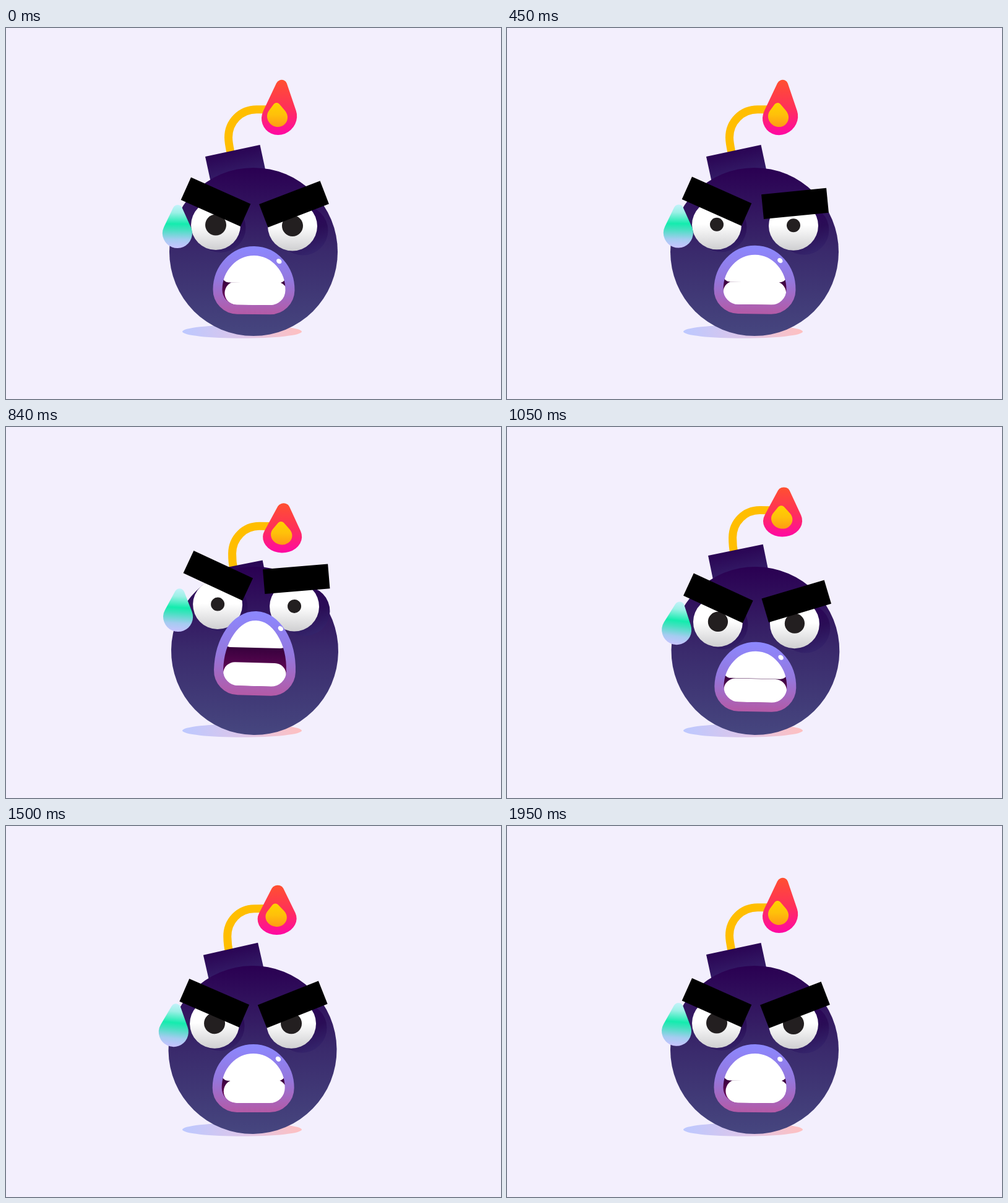
An HTML page with a canvas that plays this animation: 800x600 px, repeating every 1980 ms.

```html
<!DOCTYPE html>
<html lang="en">
<head>
<meta charset="utf-8">
<title>Angry bomb</title>
<style>
html, body { margin: 0; width: 100%; height: 100%; overflow: hidden; background: #f3effd; }
canvas { display: block; width: 800px; height: 600px; }
</style>
</head>
<body>
<canvas id="stage" width="800" height="600"></canvas>
<script>
const ctx = document.getElementById('stage').getContext('2d');
const LOOP = 1980, TAU = Math.PI * 2, RAD = Math.PI / 180;

// Five poses per 180 ms, the first one held twice as long.
function beatAt(ms) {
  const slot = Math.floor((ms % LOOP) / 30);
  return 5 * Math.floor(slot / 6) + Math.max(0, slot % 6 - 1);
}

// Eased interpolation through [beat, value] pairs.
function key(b, ...pts) {
  if (b <= pts[0][0]) return pts[0][1];
  for (let i = 1; i < pts.length; i++) {
    const [t0, v0] = pts[i - 1], [t1, v1] = pts[i];
    if (b <= t1) return v0 + (v1 - v0) * (1 - Math.cos(Math.PI * (b - t0) / (t1 - t0))) / 2;
  }
  return pts[pts.length - 1][1];
}

// Flicker with a period of six beats.
function flick(b, mid, c, s) {
  const a = b * TAU / 6;
  return mid + c * Math.cos(a) + s * Math.sin(a);
}

function grad(x0, y0, x1, y1, ...stops) {
  const g = ctx.createLinearGradient(x0, y0, x1, y1);
  stops.forEach((s, i) => Array.isArray(s) ? g.addColorStop(s[0], s[1])
    : g.addColorStop(i / (stops.length - 1), s));
  return g;
}

function oval(x, y, rx, ry, fill, turn = 0) {
  ctx.beginPath();
  ctx.ellipse(x, y, rx, ry, turn, 0, TAU);
  ctx.fillStyle = fill;
  ctx.fill();
}

function at(x, y, turn, draw) {
  ctx.save();
  ctx.translate(x, y);
  ctx.rotate(turn);
  draw();
  ctx.restore();
}

// Rounded teardrop standing on `bottom`; tall and tip are relative to the base radius.
function tear(cx, bottom, w, h, lean, tall, tip, ...stops) {
  const d = tall - 1 - tip, a = Math.asin((1 - tip) / d), sy = h / tall;
  ctx.save();
  ctx.transform(w / 2, 0, -lean / d, sy, cx, bottom - sy);
  ctx.beginPath();
  ctx.arc(0, 0, 1, -a, Math.PI + a);
  ctx.arc(0, -d, tip, Math.PI + a, TAU - a);
  ctx.closePath();
  ctx.fillStyle = grad(0, 1 - tall, 0, 1, ...stops);
  ctx.fill();
  ctx.restore();
}

function fuse(b) {
  const glow = Math.cos((b - 1) * TAU / 6), k = (0.5 - glow) / 1.5;
  const x = 359.5 + 2.6 * k, y = 131.7 + 3 * k;
  ctx.beginPath();
  ctx.moveTo(364 + 0.6 * k, 206);
  ctx.bezierCurveTo(361.5, 194, x, 186, x, 177 + 2 * k);
  ctx.bezierCurveTo(x, 152 + 2 * k, 379 + 2 * k, y, 405, y);
  ctx.lineTo(424, y);
  ctx.lineWidth = 13;
  ctx.strokeStyle = '#ffbe00';
  ctx.stroke();

  const top = 90 - 12.4 * glow, base = 174.7 - 3.3 * glow;
  tear(441.8 - 0.3 * glow, base, 60 - 6 * glow, base - top, 2.3 + 2.3 * glow,
    3.12, 0.32, '#ff5030', '#ff3158', '#ff08a4');
  tear(flick(b, 441, -2.5, -0.87), flick(b, 161.7, -1.7, -2.9),
    flick(b, 30.7, 2.3, -2.9), flick(b, 41.7, -2.7, 3.4), flick(b, 0, -1, 0.5),
    2.4, 0.36, '#ffd200', '#ffc00a', '#ff9a14');
}

function cap() {
  at(322, 208, -12.2 * RAD, () => {
    ctx.fillStyle = grad(0, 0, 0, 46, '#2a0454', '#35206a');
    ctx.fillRect(0, 0, 90.5, 70);
  });
}

function eye(x, y, r, shX, shY) {
  oval(x + shX, y + shY, 40.5, 40, grad(x, y - 20, x + 22, y + 45, '#2c0458', '#2a0d56', '#34236a'));
  oval(x, y, 40, 40, grad(0, y - 40, 0, y + 40, [0, '#fff'], [0.48, '#fff'], [1, '#cfcfd1']));
  oval(x, y - 0.5, r, r, '#231f20');
}

function brow(x, y, deg, w) {
  at(x, y, deg * RAD, () => {
    ctx.fillStyle = '#000';
    ctx.fillRect(-w / 2, -20, w, 40);
  });
}

function mouthPath(top, bottom, l, r) {
  const mid = (l + r) / 2, rx = mid - l, c = 0.552;
  const side = bottom - 32, ry = side - top;
  ctx.beginPath();
  ctx.moveTo(l, side);
  ctx.bezierCurveTo(l, side - ry * c, mid - rx * c, top, mid, top);
  ctx.bezierCurveTo(mid + rx * c, top, r, side - ry * c, r, side);
  ctx.arcTo(r, bottom, mid, bottom, 32);
  ctx.arcTo(l, bottom, l, side, 32);
  ctx.closePath();
}

function mouth(s, jaw) {
  const top = 353 - 55 * s, bottom = 463 - 29 * s;
  at(400, bottom, 0.7 * RAD, () => {
    ctx.translate(-400, -bottom);
    mouthPath(top + 7.5, bottom - 7.5, 341.5, 458.5);
    ctx.save();
    ctx.clip();
    ctx.fillStyle = grad(0, top + 50, 0, bottom - 15, '#2e0038', '#7a0a62');
    ctx.fillRect(330, top, 140, bottom - top);
    ctx.fillStyle = '#fff';
    ctx.beginPath();
    ctx.roundRect(348, top - 10, 104, 69, 12);
    ctx.roundRect(349 + jaw, bottom - 53, 102, 38, 19);
    ctx.fill();
    ctx.restore();
    mouthPath(top + 7.5, bottom - 7.5, 341.5, 458.5);
    ctx.lineWidth = 15;
    ctx.strokeStyle = grad(0, top, 0, bottom, '#8c88ff', '#9478de', '#b45aa6');
    ctx.stroke();
  });
  oval(441.3, 377.3 - 52 * s, 4.6, 3.6, '#fff', 0.7);
}

function render(b) {
  const scream = key(b, [11, 0], [16, 0.24], [21, 1], [25, 1], [30, 0]);
  const sink = 26.5 * Math.pow(scream, 1.5);
  const shake = key(b, [16, 0], [23, 0.94], [28, 2.1], [36, 1.55], [45, 0]);
  const tilt = shake * Math.sin((b - 16) * TAU / 5.3);
  const pupil = key(b, [0, 17], [8, 13], [16, 9], [23, 11], [31, 17]);
  const rightBrow = key(b, [0, -21], [6, -5.6], [25, -5.6], [31, -21]);
  const dip = key(b, [36, 0], [41, 4.5]);
  const jaw = key(b, [1, 4], [5, -2], [9, -2], [13, 0], [29, 0], [33, -2], [38, -2], [42, 4]);
  const swing = -2 + 3.5 * Math.cos((b - 9.8) * TAU / 12) - 3 * scream;

  ctx.fillStyle = '#f3effd';
  ctx.fillRect(0, 0, 800, 600);
  oval(381.5, 491, 96.5, 10.8, grad(285, 0, 478, 0, '#bcc8ff', '#dcc6ea', '#ffc0c0'));

  at(400, 497, tilt * RAD, () => {
    ctx.translate(-400, -497);
    ctx.save();
    ctx.translate(0, sink);
    fuse(b);
    cap();
    ctx.restore();

    oval(400, 362, 136 - scream, 136, grad(0, 226, 0, 498, '#2a0052', '#3a2a6c', '#46467f'));

    const lift = 31 * scream;
    eye(339, 319 - lift, pupil, 8, 4);
    eye(463, 320.5 - lift, pupil, 17, 7);
    const raise = 40 * scream - dip;
    brow(339, 281.2 - raise, 24.1, 105.5);
    brow(465.5, 284.8 - raise, rightBrow, 105.5);
    mouth(scream, jaw);

    at(277.5, 287 - 23 * scream, -swing / 45, () =>
      tear(0, 69, 48, 70, 0, 2.92, 0.33,
        [0, '#c4f2fa'], [0.18, '#9cf0e6'], [0.44, '#14ecae'], [0.56, '#3fe2be'], [0.8, '#a4ccf0'], [1, '#c8c2ff']));
  });
}

const start = performance.now();
function tick() {
  render(beatAt(performance.now() - start));
  requestAnimationFrame(tick);
}
tick();
</script>
</body>
</html>
```
